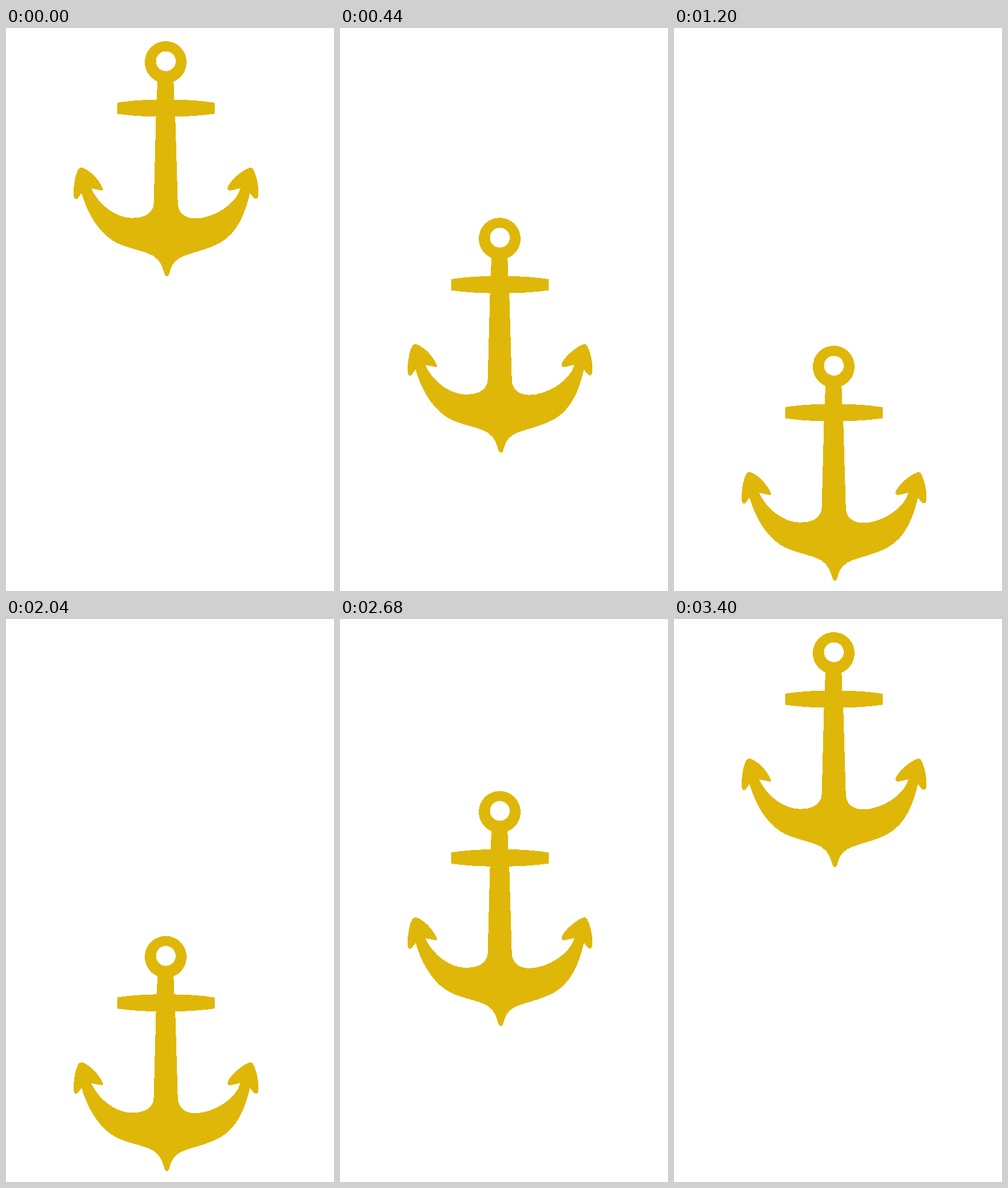
An HTML page that plays this animation: 572x980 px, repeating every 4240 ms.

```html
<!DOCTYPE html>
<html lang="en">
<head>
<meta charset="utf-8">
<title>Anchor</title>
<style>
  html, body { margin: 0; width: 100%; height: 100%; overflow: hidden; background: #fff; }
  svg { display: block; width: 572px; height: 980px; }
</style>
</head>
<body>
<svg viewBox="0 0 572 980" shape-rendering="crispEdges">
  <g id="anchor" fill="#dfb709">
    <circle cx="278.5" cy="59.5" r="36.5"/>
    <circle cx="278.75" cy="57.75" r="17.25" fill="#fff"/>
    <path d="M263.800 90 L263.200 124.700 Q226 125 193.500 130 V149.300 Q226 154 261.600 154.300
      L257.600 305 C257 322 243 330.800 220 330.800 C191 330.500 162 308 148.500 279.300
      L166.500 282.800 Q170.500 283 169 279.500 C162 263 146 247.500 133.500 243.300
      Q129.500 242 126.500 245.500 C121 254 117.500 274 118 289.500 C118.200 299 122.500 300 126 295
      L131.800 287.500 C140.500 317 157 350.500 184.500 369 C207 384 239 386 257.500 397
      C270.500 405.500 273.200 418 276.300 428 Q278 432 280.500 432 Q283.500 432 284.700 428
      C287.300 416 291.500 407 302.500 400.500 C320 391 349 387.500 373.500 373.700 C403.500 357 417.500 322 425.400 287.500
      L431.500 295 C435.500 299.500 439.500 298 440 291 C441.300 274 436.500 257 431.500 247
      Q429 242 424.500 243.300 C413 247 395 262 388 274 C384.500 280.500 387 284.300 393 282.500
      L408.800 279 C402 306 362 331.500 330 331.500 C311 331.500 300 321 299.700 305
      L295.200 154.300 Q331 154 363.500 149.300 V130 Q331 125 293.500 124.700 L292.200 90 Z"/>
  </g>
</svg>
<script>
  const LOOP = 4240, STEP = 40;
  // [time in ms, vertical offset], eased between neighbours
  const keys = [[0, 0], [92, 0], [735, 547], [1058, 476], [1198, 530], [2000, 530], [3400, 0], [LOOP, 0]];
  const anchor = document.getElementById('anchor');
  const ease = s => s * s * (3 - 2 * s);

  function offset(t) {
    const i = keys.findIndex(k => t < k[0]);
    const [t0, y0] = keys[i - 1], [t1, y1] = keys[i];
    return y0 + (y1 - y0) * ease((t - t0) / (t1 - t0));
  }

  const start = performance.now();
  function draw() {
    // the motion advances at 25 pictures a second
    const t = Math.floor((performance.now() - start + 1) / STEP) * STEP % LOOP;
    anchor.setAttribute('transform', `translate(0 ${offset(t).toFixed(2)})`);
    requestAnimationFrame(draw);
  }
  draw();
</script>
</body>
</html>
```
